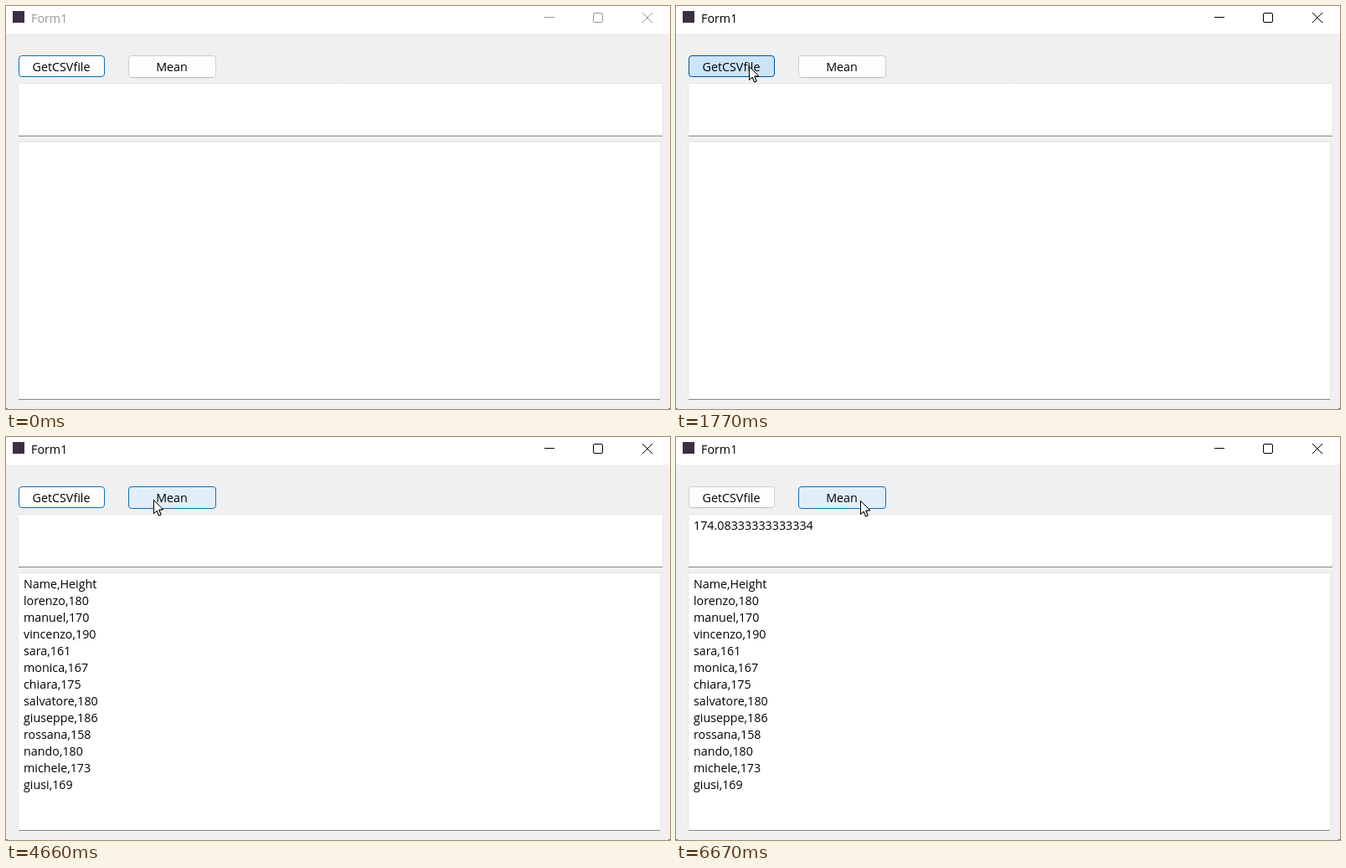
Write an HTML page with a canvas that moves like this. It is 793 px wide and 482 px high and loops after 8 s.

```html
<!DOCTYPE html>
<html lang="en">
<head>
<meta charset="utf-8">
<title>Form1</title>
<style>
  html, body { margin: 0; width: 100%; height: 100%; overflow: hidden; background: #f0f0f0; }
  canvas { display: block; }
</style>
</head>
<body>
<canvas id="stage" width="793" height="482"></canvas>
<script>
const LOOP = 8000;
const ctx = document.getElementById('stage').getContext('2d');
const FONT = '14.3px "Open Sans", "Noto Sans", sans-serif';
const ROWS = ['Name,Height', 'lorenzo,180', 'manuel,170', 'vincenzo,190', 'sara,161',
  'monica,167', 'chiara,175', 'salvatore,180', 'giuseppe,186', 'rossana,158',
  'nando,180', 'michele,173', 'giusi,169'];
const MEAN = '174.08333333333334';

const CSV_BUTTON = { x: 15, y: 59, w: 103, h: 26, label: 'GetCSVfile' };
const MEAN_BUTTON = { x: 146, y: 59, w: 105, h: 27, label: 'Mean' };
const RESULT_BOX = { x: 14, y: 92, w: 771, h: 64 };
const LIST_BOX = { x: 14, y: 162, w: 768, h: 309 };

// Pointer moves: each runs in evenly timed steps; px and py shape the easing.
const MOVES = [
  { start: 500, end: 1300, steps: 13, from: [58, 472], to: [99, 89], px: s => s ** 1.52, py: s => 1 - (1 - s) ** 1.317 },
  { start: 1370, end: 1510, steps: 3, from: [94, 79], to: [87, 71] },
  { start: 1700, end: 1700, steps: 1, from: [87, 72], to: [87, 72] },
  { start: 4370, end: 4930, steps: 9, from: [102, 72], to: [226, 78], px: s => 1 - (1 - s) ** 1.3 },
  { start: 5070, end: 5330, steps: 4, from: [225, 78], to: [220, 75] },
  { start: 6590, end: 6590, steps: 1, from: [220, 76], to: [220, 76] }
];

const within = (t, a, b) => t >= a && t < b;
const inside = (p, r) => p.x >= r.x && p.x < r.x + r.w && p.y >= r.y && p.y < r.y + r.h;

function pointerAt(t) {
  const move = MOVES.filter(m => t >= m.start).pop();
  if (!move) return null;
  const last = move.steps - 1;
  const s = last ? Math.min(last, Math.floor((t - move.start) / (move.end - move.start) * last + 1e-6)) / last : 1;
  const ease = i => ([move.px, move.py][i] || (v => v))(s);
  const at = i => Math.round(move.from[i] + (move.to[i] - move.from[i]) * ease(i));
  return { x: at(0), y: at(1) };
}

function rect(x, y, w, h, color) {
  ctx.fillStyle = color;
  ctx.fillRect(x, y, w, h);
}

function text(str, x, y, color = '#000', align = 'left') {
  ctx.font = FONT;
  ctx.textAlign = align;
  ctx.fillStyle = color;
  ctx.fillText(str, x, y);
}

function roundBox(x, y, w, h, r, fill, stroke) {
  ctx.beginPath();
  ctx.roundRect(x + 0.5, y + 0.5, w - 1, h - 1, r);
  if (fill) {
    ctx.fillStyle = fill;
    ctx.fill();
  }
  ctx.strokeStyle = stroke;
  ctx.lineWidth = 1;
  ctx.stroke();
}

function polyline(points, color, close) {
  ctx.beginPath();
  points.forEach(([x, y]) => ctx.lineTo(x, y));
  if (close) ctx.closePath();
  ctx.strokeStyle = color;
  ctx.lineWidth = 1;
  ctx.stroke();
}

function drawTitleBar(active) {
  const ink = active ? '#000' : '#999';
  rect(0, 0, 793, 33, '#fff');
  rect(8, 6, 14, 14, '#3b2f45');
  text('Form1', 30, 20, ink);
  polyline([[643, 13.5], [655, 13.5]], ink);
  roundBox(701, 8, 12, 12, 1.5, null, ink);
  polyline([[760, 8], [772, 20]], ink);
  polyline([[772, 8], [760, 20]], ink);
}

function drawTextBox({ x, y, w, h }) {
  roundBox(x, y, w, h, 1, '#fff', '#e5e5e5');
  rect(x + 1, y + h - 1, w - 2, 1, '#868686');
}

function drawButton({ x, y, w, h, label }, { hover, pressed, focus }) {
  const fill = pressed ? '#cce4f7' : hover ? '#e0eef9' : '#fdfdfd';
  const edge = pressed ? '#005499' : hover || focus ? '#0a70b8' : '#d0d0d0';
  roundBox(x, y, w, h, 3.5, fill, edge);
  if (!hover && !focus) rect(x + 4, y + h - 1, w - 8, 1, '#bababa');
  text(label, x + w / 2 - 0.5, 78, '#000', 'center');
}

function drawArrow({ x, y }) {
  ctx.save();
  ctx.translate(x + 0.5, y + 0.5);
  const shape = [[0, 0], [0, 16], [3.7, 12.6], [6.2, 18.5], [8.7, 17.4], [6.2, 11.6], [11.2, 11.2]];
  polyline(shape, '#000', true);
  ctx.fillStyle = '#fff';
  ctx.fill();
  polyline(shape, '#000', true);
  ctx.restore();
}

function drawBeam({ x, y }) {
  rect(x, y - 7, 1, 14, '#000');
  for (const edge of [y - 8, y + 7]) {
    rect(x - 3, edge, 3, 1, '#000');
    rect(x + 1, edge, 3, 1, '#000');
  }
}

function draw(t) {
  const pointer = pointerAt(t);
  const over = r => pointer !== null && inside(pointer, r);
  const meanClicked = t >= 6590;

  rect(0, 0, 793, 482, '#f0f0f0');
  rect(0, 481, 2, 1, '#777');
  rect(791, 481, 2, 1, '#777');
  drawTitleBar(t >= 1700);
  drawButton(CSV_BUTTON, { hover: over(CSV_BUTTON), pressed: within(t, 1700, 1840), focus: !meanClicked });
  drawButton(MEAN_BUTTON, { hover: over(MEAN_BUTTON), pressed: within(t, 6590, 6670), focus: meanClicked });
  drawTextBox(RESULT_BOX);
  drawTextBox(LIST_BOX);
  if (t >= 1840) ROWS.forEach((row, i) => text(row, 21, 181 + i * 20));
  if (t >= 6670) text(MEAN, 21, 111);

  if (pointer) (over(RESULT_BOX) || over(LIST_BOX) ? drawBeam : drawArrow)(pointer);
}

const began = performance.now();
function tick() {
  draw((performance.now() - began) % LOOP);
  requestAnimationFrame(tick);
}
tick();
</script>
</body>
</html>
```
